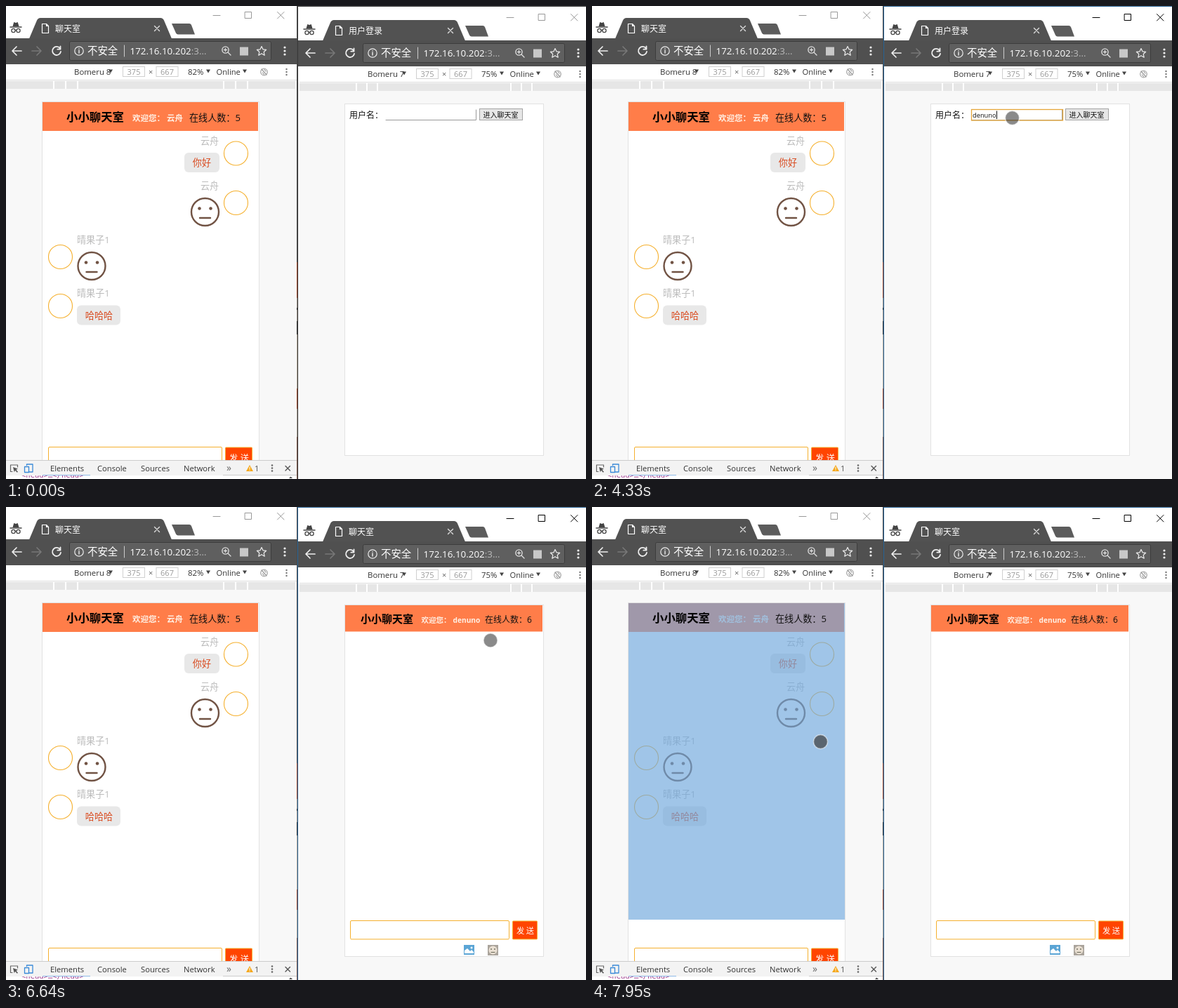
Recreate the animation shown at these times as an HTML page. Size 826 by 674 pixels, loop 8000 ms.

```html
<!DOCTYPE html>
<html lang="zh-CN">
<head>
<meta charset="utf-8">
<title>聊天室</title>
<style>
  html, body { margin: 0; width: 100%; height: 100%; overflow: hidden; background: #fff; }
  svg { display: block; width: 826px; height: 674px; }
  text { font-family: "Open Sans", "Noto Sans CJK SC", "Noto Sans CJK", sans-serif; white-space: pre; }
  .line { fill: none; stroke-linecap: round; stroke-linejoin: round; }
  .hide { display: none; }
</style>
</head>
<body>
<svg id="stage" viewBox="0 0 826 674"></svg>
<script>
const LOOP = 8000;
const USER = "denuno";
const AMBER = "#f5b02e";

const rect = (x, y, w, h, fill, extra = "") =>
  `<rect x="${x}" y="${y}" width="${w}" height="${h}" fill="${fill}" ${extra}/>`;
const text = (x, y, size, str, fill = "#333", extra = "") =>
  `<text x="${x}" y="${y}" font-size="${size}" fill="${fill}" ${extra}>${str}</text>`;
const line = (d, color, width = 1, extra = "") =>
  `<path class="line" d="${d}" stroke="${color}" stroke-width="${width}" ${extra}/>`;
const shape = (d, fill) => `<path d="${d}" fill="${fill}"/>`;
const dot = (x, y, r, fill, extra = "") =>
  `<circle cx="${x}" cy="${y}" r="${r}" fill="${fill}" ${extra}/>`;
const ring = (x, y, r, color, width = 1) =>
  dot(x, y, r, "none", `stroke="${color}" stroke-width="${width}"`);
const dots = (x, y, gap, r, fill) => [-gap, 0, gap].map(d => dot(x, y + d, r, fill)).join("");
const group = (id, body, extra = "") => `<g id="${id}" ${extra}>${body}</g>`;
const caretDown = (x, y) => shape(`M${x - 3} ${y - 2.5}h6l-3 5z`, "#444");

function titleBar(id) {
  return text(70, 36.5, 12, id === "left" ? "聊天室" : "用户登录", "#fff", `id="${id}-title"`)
    + group(id + "-page-icon", line("M51.5 25.5h6l3 3v10h-9zM57.5 25.5v3h3", "#fff", 1.2))
    + group(id + "-controls", line("M295 13.5h10M340.5 8.5h9v9h-9zM386.5 8.5l9.5 9.5M396 8.5l-9.5 9.5", "currentColor", 1), 'color="#999"');
}

function addressBar(id) {
  return rect(90.5, 50.5, 287, 27, "#5f5f5f", 'rx="2" stroke="#3c3c3c"')
    + line("M22 64H9.5M15 58l-6 6 6 6", "#eee", 1.7)
    + line("M37 64h12.5M44 58l6 6-6 6", "#777", 1.7)
    + group(id + "-reload", line("M77 60.5a6 6 0 1 0 1 4.5M77.5 57.5v4.2h-4.2", "#eee", 1.8))
    + ring(104, 64, 6.2, "#eee", 1.2) + line("M104 63v4M104 60.8v.1", "#eee", 1.4)
    + text(116, 69.3, 14.4, "不安全", "#fff")
    + line("M168.5 56v16", "#ccc")
    + text(176.5, 69, 13.4, `172.16.10.202<tspan id="${id}-path" fill="#bbb">:3…</tspan>`, "#fff")
    + group(id + "-zoom", ring(312.5, 62.5, 4.6, "#ddd", 1.4) + line("M316 66l4 4M310.5 62.5h4M312.5 60.5v4", "#ddd", 1.3))
    + rect(333, 58.5, 12, 12, "#c8c8c8", `id="${id}-square"`)
    + line("M364 57.5l2 4.3 4.7.5-3.5 3.2 1 4.7-4.2-2.4-4.2 2.4 1-4.7-3.5-3.2 4.7-.5z", "#eee", 1.2)
    + dots(397, 64, 5, 1.6, "#eee");
}

function deviceBar(device, zoom) {
  const size = (x, n) => rect(x + .5, 86.5, 31, 14, "#fff", 'stroke="#d0d0d0"')
    + text(x + 16, 98, 11, n, "#999", 'text-anchor="middle"');
  return rect(0, 83, 414, 22, "#fff") + rect(0, 105, 414, 1, "#e0e0e0")
    + text(97, 98, 11.4, device) + caretDown(149, 93)
    + size(166, 375) + text(203, 98, 11, "×", "#666") + size(213.5, 667)
    + text(259, 98, 11.4, zoom) + caretDown(288, 93)
    + text(299.5, 98, 11.2, "Online") + caretDown(340, 93)
    + ring(367.5, 94, 4.8, "#aaa", 1.3) + line("M364 90l7 8M365.5 95l2 2.5M368 90.5l2 2.5", "#999", 1.2)
    + dots(399.5, 94, 4, 1.2, "#777");
}

function browser(id, dx, dy, device, zoom, marks) {
  const gaps = marks.flatMap(m => [-m, m]).map(m => rect(205 + m, 107, 2, 11, "#fff")).join("");
  return `<g transform="translate(${dx} ${dy})">`
    + rect(0, 0, 414, 46, "#fff")
    + line("M6 30h16", "#444", 1.5) + shape("M9.5 29l1.8-6 2.7 1 2.7-1 1.8 6z", "#444")
    + ring(10.5, 35, 2.6, "#444", 1.3) + ring(17.5, 35, 2.6, "#444", 1.3) + line("M13 34.5h2", "#444")
    + shape("M33 46.5L44 20.5Q45.5 17 49 17H220Q223.500 17 225 20.5L236 46.5z", "#525252")
    + shape("M236 25h25q2 0 3 2l5 13.5h-24q-2 0-3-2z", "#5c5c5c")
    + titleBar(id)
    + line("M211.5 28.5l7 7M218.5 28.5l-7 7", "#ddd", 1.4)
    + rect(0, 46, 414, 37, "#505050") + addressBar(id)
    + rect(0, 106, 414, 569, "#f8f8f8") + deviceBar(device, zoom)
    + rect(0, 107, 412, 11, "#e6e6e6") + gaps
    + "</g>";
}

const face = (x, y) => ring(x, y, 19.5, "#715344", 2.4)
  + dot(x - 8, y - 5, 2.3, "#715344") + dot(x + 8, y - 5, 2.3, "#715344")
  + line(`M${x - 7.5} ${y + 8.5}h15`, "#715344", 2.4);
const avatar = (x, y) => ring(x, y, 17, AMBER, 1.1);
const bubble = (x, y, w, str) => rect(x, y, w, 28, "#e8e8e8", 'rx="6"')
  + text(x + 11.8, y + 19, 13.1, str, "#d9481c");
const sender = (x, y, str) => text(x, y + 5, 13.1, str, "#bbb");

function sendForm(x, y, w, bx, bw, size) {
  const h = size * 2.3, base = y + 2 + h / 2 + size * .38;
  return rect(x + .5, y + .5, w - 1, h + .5, "#fff", `rx="1.5" stroke="${AMBER}"`)
    + rect(bx + .5, y + 1, bw - 1, h, "#ff4500", `rx="1" stroke="${AMBER}"`)
    + text(bx + 6, base, size, "发", "#fff")
    + text(bx + bw - 5 - size, base, size, "送", "#fff");
}

const leftPage = rect(51.5, 136.5, 309, 520, "#fff", 'stroke="#e2e2e2"')
  + rect(52, 137, 307, 41, "#ff7d49")
  + text(180, 164, 11.5, "欢迎您：", "#fff0e4", 'font-weight="bold"')
  + text(229, 164, 11.5, "云舟", "#fff0e4", 'font-weight="bold"')
  + sender(277, 192, "云舟") + bubble(254, 209, 50, "你好") + avatar(327.5, 210)
  + sender(277, 256, "云舟") + face(283.5, 293.5) + avatar(327.5, 280.5)
  + sender(101, 333, "晴果子1") + face(122, 370.5) + avatar(77.5, 357.5)
  + sender(101, 409, "晴果子1") + bubble(101, 426.5, 62, "哈哈哈") + avatar(77.5, 427.5)
  + sendForm(60, 628, 248, 312, 39, 12.3)
  + group("highlight", rect(52, 137, 308, 451, "#6fa8dc", 'fill-opacity=".66"'))
  + text(86, 164, 16.4, "小小聊天室", "#000", 'font-weight="bold"')
  + text(261, 164, 13.1, "在线人数：5", "#111");

const devTools = rect(0, 648, 414, 26, "#fff")
  + text(22, 672, 10.5, "&lt;head&gt;…&lt;/head&gt;", "#a04090", 'style="font-family:\'DejaVu Sans Mono\',monospace"')
  + rect(0, 648, 414, 21, "#f3f3f3") + rect(0, 647, 414, 1, "#ccc") + rect(52, 668, 68, 1, "#8fbbe8")
  + rect(309, 668, 105, 1, "#ccc")
  + line("M9 663.5H6.5v-9.5h10v3", "#666", 1.2) + shape("M10 657l7 2.5-2.6 1.3 2.6 3-1.2 1-2.7-3-1.3 2.5z", "#555")
  + line("M29.5 654.5v-1.5h8.5v11h-5M26.5 656.5h6v8h-6z", "#3b8ad8", 1.3)
  + [["Elements", 63], ["Console", 130], ["Sources", 192], ["Network", 253]].map(([s, x]) => text(x, 663, 11.2, s)).join("")
  + text(314, 663, 14, "»", "#666")
  + shape("M347 654l5 9h-10z", "#f5a81c") + line("M347 657v3M347 661.5v.1", "#fff") + text(354, 663, 11.2, "1", "#555")
  + dots(379, 658.5, 4, 1.3, "#666") + line("M398 655.5l6.5 6.5M404.5 655.5l-6.5 6.5", "#555", 1.4)
  + shape("M403 673l2.5-2.5 2.5 2.5z", "#444");

const login = text(489, 159.5, 12, "用户名：", "#111")
  + line("M541 162.5h128.5V148", "#999")
  + group("focus", rect(540.5, 147.5, 130, 15.5, "none", 'stroke="#e5a63a" stroke-width="1.3"'))
  + text(542, 159, 9.3, "", "#111", 'id="field"')
  + rect(542, 149.5, 1, 11.5, "#111", 'id="caret"')
  + rect(674.5, 146.5, 61, 16, "#e6e6e6", 'stroke="#a5a5a5"')
  + text(679.5, 159, 10, "进入聊天室", "#111");

const chat = rect(483, 140, 281, 37.5, "#ff7d49")
  + text(505, 165, 15, "小小聊天室", "#000", 'font-weight="bold"')
  + text(591.5, 164.5, 10.5, "欢迎您：", "#fff0e4", 'font-weight="bold"')
  + text(636.5, 164.5, 10.2, USER, "#fff0e4", 'font-weight="bold"')
  + text(682, 165, 12, "在线人数：6", "#111")
  + sendForm(490, 589, 227, 721, 36, 11.25)
  + rect(652, 624, 15, 14, "#5ba5d5") + shape("M653 636v-4l4-3 4 4 2-2 3 3v2z", "#fff") + dot(663, 628, 1.5, "#fff")
  + rect(686, 624, 15, 15, "#aaa49c") + dot(693.5, 631.5, 6, "#e9dfd2")
  + dot(691, 630, .9, "#665") + dot(696, 630, .9, "#665") + line("M691 634.5h5", "#665");

// Sliver of desktop between the two windows: [top, height, colour]
const desktop = [[0, 365, "#4a4a4a"], [365, 51, "#a1492b"], [416, 33, "#9a9288"], [430, 3, "#333"], [449, 19, "#333"],
  [468, 77, "#b3a89b"], [545, 29, "#a1492b"], [574, 40, "#a9a096"], [614, 60, "#7c5648"]]
  .map(([y, h, c]) => rect(414, y, 1, h, c)).join("");

document.getElementById("stage").innerHTML =
  `<defs><linearGradient id="fade" gradientUnits="userSpaceOnUse" x1="182" x2="203">
    <stop stop-color="#fff"/><stop offset="1" stop-color="#fff" stop-opacity="0"/></linearGradient></defs>`
  + browser("left", 0, 0, "Bomeru 8", "82%", [104, 121, 138]) + leftPage + devTools
  + browser("right", 418, 3, "Bomeru 7", "75%", [95, 110, 125])
  + rect(414, 0, 4, 674, "#fff") + rect(416, 49, 2, 37, "#505050") + rect(416, 109, 2, 565, "#f8f8f8")
  + desktop + group("frame", rect(415, 0, 1, 674, "currentColor") + rect(415, 0, 411, 1, "currentColor"))
  + rect(482.5, 139.5, 283, 501, "#fff", 'stroke="#e2e2e2"')
  + group("login", login) + group("chat", chat)
  + group("loading", line("M485 62l10.5 10.5M495.5 62L485 72.5", "#eee", 1.8)
    + line("M473 29.5a6 6 0 0 1 0 12", "#ddd", 1.8, 'id="spinner"'))
  + dot(0, 0, 10, "#3c3c3c", 'id="pointer" fill-opacity=".6" stroke="#fff" stroke-opacity=".5" stroke-width="1.5"');

const $ = id => document.getElementById(id);
const show = (id, on) => $(id).classList.toggle("hide", !on);
const within = (t, a, b) => t >= a && t < b;

const keyTimes = [3180, 3470, 3640, 3870, 4110, 4330];
const caretSpans = [[1070, 1620], [2170, 2630], [3180, 4790], [5250, 5790]];

// Pointer stops: [time, x, y]; a lone time hides it.
const stops = [
  [0], [370, 640, 600], [450, 636, 520], [530, 630, 430], [610, 622, 340], [690, 614, 260],
  [770, 607, 200], [850, 602, 160], [920, 601, 154.5], [990, 600, 157], [1070, 599, 160],
  [1150, 598.5, 160.5], [1450, 598.5, 159.5], [5020, 630, 153], [5100, 652, 151],
  [5250, 667, 151], [5330, 673, 154], [5560, 705, 158], [5640, 713, 161.5],
  [6640, 690, 190], [6720, 640, 240], [6800, 560, 290], [6870, 495, 330], [6950],
  [7250, 348, 382], [7640, 330, 350], [7720, 292, 328], [7790, 281, 324], [7870, 306, 329], [7950, 325.5, 334.5]
];

function render(t) {
  const active = t >= 990, loading = within(t, 6250, 6410), joined = t >= 6410;
  $("right-controls").setAttribute("color", active ? "#000" : "#999");
  $("frame").setAttribute("color", active ? "#2a6496" : "#3a3a3a");
  show("login", !joined);
  show("chat", joined);
  show("focus", within(t, 990, 6170));
  show("highlight", t >= 7250);

  $("field").textContent = USER.slice(0, keyTimes.filter(k => t >= k).length);
  $("caret").setAttribute("x", 542 + (joined ? 0 : Math.round($("field").getComputedTextLength())));
  show("caret", caretSpans.some(([a, b]) => within(t, a, b)));

  const title = $("right-title");
  title.textContent = joined ? "聊天室" : loading ? "172.16.10.202:3009/chat" : "用户登录";
  title.setAttribute("font-size", loading ? 11.5 : 12);
  title.setAttribute("fill", loading ? "url(#fade)" : "#fff");
  $("right-path").textContent = loading ? ":3009/…" : ":3…";
  $("right-zoom").setAttribute("transform", loading ? "translate(25 0)" : "");
  show("right-square", !loading);
  show("right-reload", !loading);
  show("right-page-icon", !loading);
  show("loading", loading);
  $("spinner").setAttribute("stroke-dasharray", `${t < 6330 ? 2 : 9} 40`);

  const [, x, y] = stops.findLast(s => t >= s[0]);
  show("pointer", x !== undefined);
  if (x !== undefined) $("pointer").setAttribute("transform", `translate(${x} ${y})`);
  const pressed = within(t, 990, 1150) || within(t, 6170, 6410) || t >= 7250;
  $("pointer").setAttribute("fill-opacity", pressed ? .7 : .6);
}

function tick() {
  render(performance.now() % LOOP);
  requestAnimationFrame(tick);
}
tick();
</script>
</body>
</html>
```
